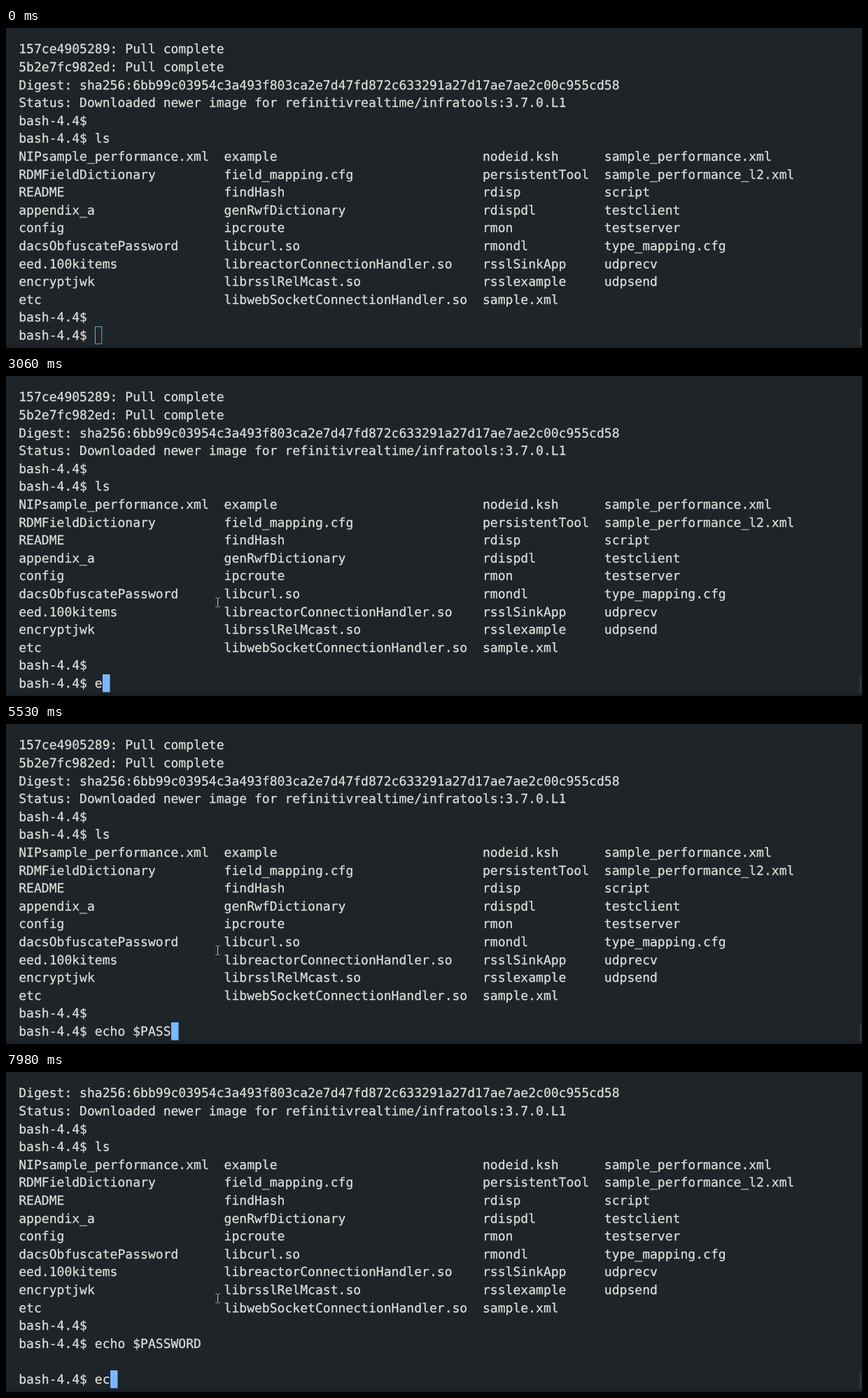
An HTML page for the animation above (8000 ms loop, 1223 px wide and 458 px high).

```html
<!DOCTYPE html>
<html lang="en">
<head>
<meta charset="utf-8">
<title>Terminal session</title>
<style>
  html, body { margin: 0; width: 100%; height: 100%; overflow: hidden; background: #1f2428; }
  svg, pre { position: absolute; left: 0; top: 0; }
  pre {
    left: 18.2px; top: 18.4px; margin: 0; color: #dcdfdc;
    font: 18.056px/25.6px "DejaVu Sans Mono", monospace;
    -webkit-text-stroke: .25px #dcdfdc;
    font-variant-ligatures: none; text-rendering: geometricPrecision;
  }
</style>
</head>
<body>
<pre id="screen"></pre>
<svg width="1223" height="458">
  <rect y="454" width="1223" height="4" fill="#191e22"/>
  <rect x="1219" y="429" width="4" height="25" fill="#2b3136"/>
  <rect id="caret"/>
  <g id="mouse">
    <circle id="press" cx="-.5" cy="-.5" r="9.5" fill="#8a8a14"/>
    <path id="beam" d="M-2.5 -6.5H-.5M1.5 -6.5H3.5M.5 -6V6M-2.5 6.5H-.5M1.5 6.5H3.5" fill="none"/>
  </g>
</svg>
<script>
const DURATION = 8000, COLUMN = 10.87, LEFT = 18.3;
const PROMPT = 'bash-4.4$ ', COMMAND = 'echo $PASSWORD';
const ENTER = 6660, CLICK = 1730, RELEASE = 1800, TICK = 200 / 3;
const firstKeys = [3060, 3340, 3410, 3740, 4410, 4670, 5000, 5200, 5400, 5530, 5730, 5930, 6060, 6260];
const secondKeys = [7850, 7980];

const files = [
  ['NIPsample_performance.xml', 'example', 'nodeid.ksh', 'sample_performance.xml'],
  ['RDMFieldDictionary', 'field_mapping.cfg', 'persistentTool', 'sample_performance_l2.xml'],
  ['README', 'findHash', 'rdisp', 'script'],
  ['appendix_a', 'genRwfDictionary', 'rdispdl', 'testclient'],
  ['config', 'ipcroute', 'rmon', 'testserver'],
  ['dacsObfuscatePassword', 'libcurl.so', 'rmondl', 'type_mapping.cfg'],
  ['eed.100kitems', 'libreactorConnectionHandler.so', 'rsslSinkApp', 'udprecv'],
  ['encryptjwk', 'librsslRelMcast.so', 'rsslexample', 'udpsend'],
  ['etc', 'libwebSocketConnectionHandler.so', 'sample.xml', '']
];
const widths = [27, 34, 16, 0];
const history = [
  '157ce4905289: Pull complete',
  '5b2e7fc982ed: Pull complete',
  'Digest: sha256:6bb99c03954c3a493f803ca2e7d47fd872c633291a27d17ae7ae2c00c955cd58',
  'Status: Downloaded newer image for refinitivrealtime/infratools:3.7.0.L1',
  PROMPT,
  PROMPT + 'ls',
  ...files.map(row => row.map((name, i) => name.padEnd(widths[i])).join('')),
  PROMPT
];

const [screenText, caret, mouse, press, beam] =
  ['screen', 'caret', 'mouse', 'press', 'beam'].map(id => document.getElementById(id));

function setAttributes(element, values) {
  for (const name in values) element.setAttribute(name, values[name]);
}

const mix = (a, b, p) => a + (b - a) * p;
const clamp = p => Math.max(0, Math.min(1, p));

function drawText(time) {
  const entered = time >= ENTER;
  const keys = entered ? secondKeys : firstKeys;
  const typed = keys.filter(key => time >= key).length;
  const past = entered ? [...history.slice(2), PROMPT + COMMAND, ''] : history;
  const text = [...past, PROMPT + COMMAND.slice(0, typed)].join('\n');
  if (screenText.textContent !== text) screenText.textContent = text;
  return typed;
}

function drawCaret(time, typed) {
  const x = Math.round(LEFT + (PROMPT.length + typed) * COLUMN);
  if (time < RELEASE) {
    setAttributes(caret, { x: x + .5, y: 427.5, width: 9.3, height: 24.5, fill: 'none', stroke: '#62aad9' });
  } else {
    setAttributes(caret, { x, y: 427, width: 10.5, height: 25.5, fill: typed ? '#7ab7ff' : '#7ab2dc', stroke: 'none' });
  }
}

function drawMouse(time) {
  const clicking = time >= CLICK && time < RELEASE;
  let x, y;
  if (time < RELEASE) {
    const step = Math.floor((time - 970) / 69 + .01);
    const p = 1 - (1 - clamp((step + 1) / 12)) ** 2;
    x = mix(604, 286, p);
    y = mix(456, 424, p);
  } else {
    const step = Math.floor((time - RELEASE) / TICK + .01);
    const p = clamp((step + 1) / 4);
    x = mix(286, 302, p);
    y = mix(424, 324, p * p * (3 - 2 * p));
  }
  setAttributes(mouse, {
    transform: `translate(${Math.round(x)} ${Math.round(y)})`,
    visibility: time < 970 ? 'hidden' : 'visible'
  });
  press.setAttribute('opacity', clicking ? 1 : 0);
  beam.setAttribute('stroke', clicking ? '#d8d86a' : '#c8cbcb');
}

const start = performance.now();
function render(now) {
  const time = Math.max(0, now - start) % DURATION;
  drawCaret(time, drawText(time));
  drawMouse(time);
  requestAnimationFrame(render);
}
render(start);
</script>
</body>
</html>
```
